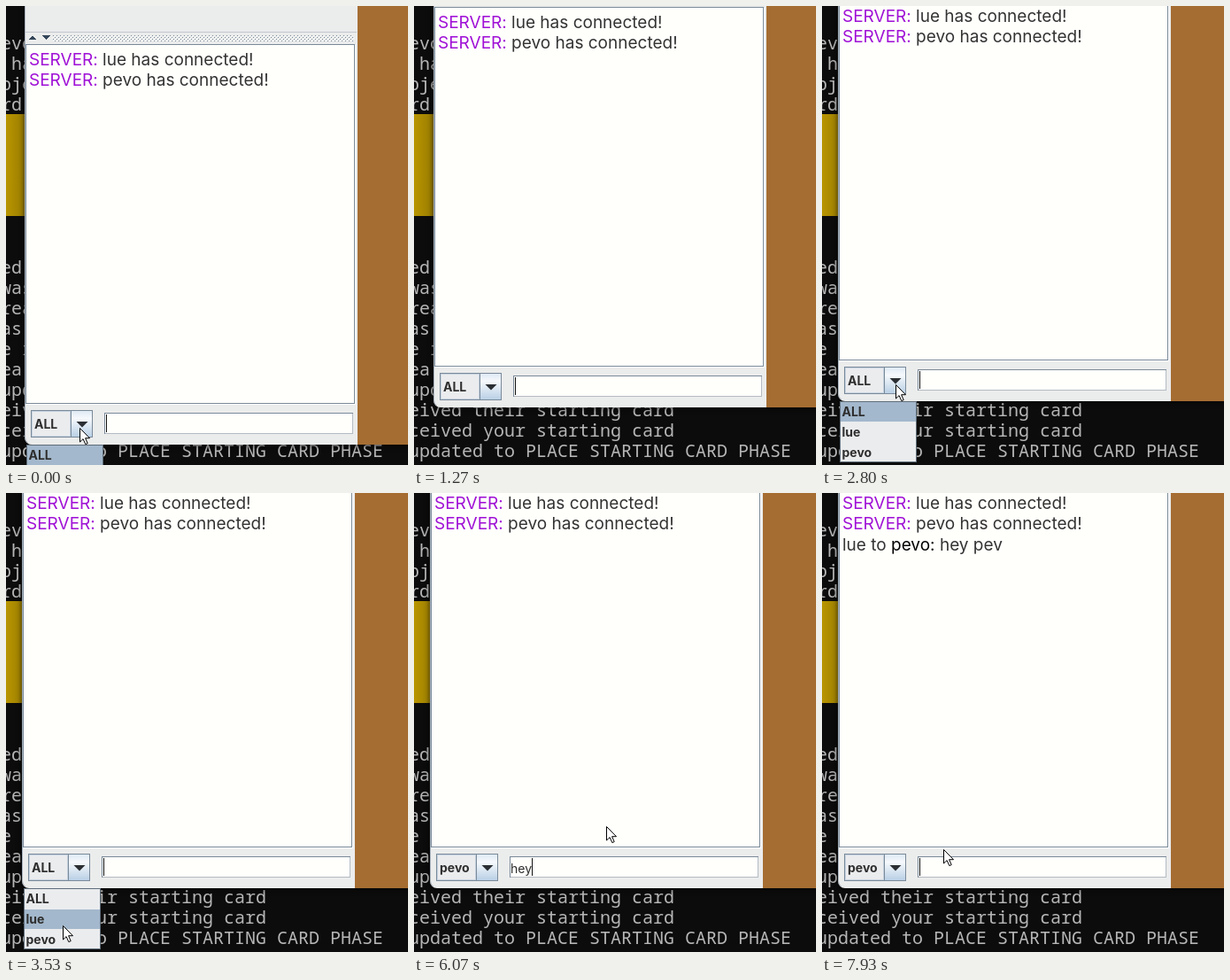
These frames come from a looping animation (454x518 px, 8000 ms). An HTML page:

```html
<!DOCTYPE html>
<html lang="en">
<head>
<meta charset="utf-8">
<title>Chat window</title>
<style>
  html, body { margin: 0; width: 100%; height: 100%; overflow: hidden; background: #0c0c0c; }
  svg { display: block; width: 100%; height: 100%; }
  text { white-space: pre; }
  #terminal { font: 20px "Noto Sans Mono", monospace; fill: #b6b6b6; }
  .chat { font: 19px Inter, sans-serif; fill: #333; }
  .server { fill: #a012d6; }
  .label { font: bold 14px Inter, sans-serif; fill: #2e2e2e; }
  .typed { font: 14px Inter, sans-serif; fill: #2e2e2e; }
  .line { fill: none; stroke: #7a8a99; }
  .crisp { shape-rendering: crispEdges; }
</style>
</head>
<body>
<svg viewBox="0 0 454 518">
  <defs>
    <pattern id="bumps" width="4" height="4" patternUnits="userSpaceOnUse">
      <path d="M0 0h1v1h-1zM2 2h1v1h-1z" fill="#fff"/>
      <path d="M1 1h1v1h-1zM3 3h1v1h-1z" fill="#7a8a99"/>
    </pattern>
    <linearGradient id="button" x2="0" y2="1">
      <stop stop-color="#dde8f3"/>
      <stop offset=".3" stop-color="#f6f9fc"/>
      <stop offset="1" stop-color="#b8cfe5"/>
    </linearGradient>
    <linearGradient id="gold">
      <stop stop-color="#b89500"/>
      <stop offset="1" stop-color="#967900"/>
    </linearGradient>
  </defs>

  <g id="terminal">
    <rect y="122" width="24" height="115" fill="url(#gold)"/>
  </g>

  <g id="window">
    <path d="M21 -80H500V495H29a8 8 0 0 1-8-8z" fill="#ebecec" style="filter:drop-shadow(0 1px 3px #000a)"/>
    <rect x="397" y="-80" width="110" height="575" fill="#a56d32"/>
    <path class="line" d="M21.5 -80V487a8 8 0 0 0 3 6" stroke-opacity=".6"/>
    <g class="crisp">
      <rect x="22" y="29" width="374" height="1" fill="#c3c8cd"/>
      <rect x="52" y="33" width="341" height="7" fill="url(#bumps)"/>
      <path d="M26 38l4-5 4 5zM40 33h10l-5 5z" fill="#34465a"/>
      <rect x="22.5" y="43.5" width="371" height="405" fill="#fffffc" stroke="#7a8a99"/>
      <path d="M394.5 44V449.5H23" fill="none" stroke="#fff"/>
    </g>

    <text class="chat" x="26" y="67"><tspan class="server">SERVER:</tspan> lue has connected!</text>
    <text class="chat" x="26" y="90"><tspan class="server">SERVER:</tspan> pevo has connected!</text>
    <text class="chat" x="26" y="114" id="message">lue to <tspan fill="#000">pevo:</tspan> hey pev</text>

    <g class="crisp">
      <rect class="line" x="28.5" y="456.5" width="69" height="30"/>
      <rect x="29.5" y="457.5" width="43" height="28" fill="#ebecee" stroke="#c5d2df"/>
      <rect x="73.5" y="456.5" width="24" height="30" fill="url(#button)" stroke="#7a8a99"/>
      <rect x="111.5" y="459.5" width="280" height="23" fill="#fffffc" stroke="#b4bbc2"/>
      <path class="line" d="M111.5 483V459.5H392"/>
      <rect id="caret" y="461" width="1" height="20" fill="#111"/>
    </g>
    <path d="M79.5 469h13l-6.500 6.500z" fill="#2b2f33"/>
    <text class="label" id="choice" x="32" y="477"></text>
    <text class="typed" id="typed" x="112" y="478"></text>

    <g id="popup">
      <rect class="crisp" x="23.500" y="495.500" width="86" height="68" fill="#ebecee" stroke="#5f6d7a"/>
      <rect class="crisp" id="highlight" x="24" width="85" height="22" fill="#a3b8cc"/>
    </g>
  </g>

  <path id="arrow" d="M.5 .5V16l3.600-3.400 2.700 6 2.400-1-2.600-5.900H11.500z" fill="#fff" stroke="#000"/>
  <g id="beam" fill="none">
    <path d="M-3 -8h2.500l.5 .5 .5-.5H3M0 -7.500V7.500M-3 8h2.500l.5-.5 .5 .5H3" stroke="#111"/>
  </g>
</svg>
<script>
const LOOP = 8000;
const names = ["ALL", "lue", "pevo"];
const $ = id => document.getElementById(id);

function addText(parent, x, y, text, className = "") {
  const node = document.createElementNS("http://www.w3.org/2000/svg", "text");
  node.setAttribute("x", x);
  node.setAttribute("y", y);
  node.setAttribute("class", className);
  node.textContent = text;
  parent.append(node);
}

const terminalRows = ("evo| ha|bje|rd||||||||ed|was|rea|as|e i|ea|upd|" +
  "eived their starting card|ceived your starting card|" +
  "updated to PLACE STARTING CARD PHASE").split("|");
terminalRows.forEach((row, i) => addText($("terminal"), -6, 49 + 23 * i, row));
names.forEach((name, i) => addText($("popup"), 25.5, 512 + 23 * i, name, "label"));

// Keyframes are [time, x, y].
const windowPath = [[0, 0, 0], [930, 0, 0], [1270, 1, -42], [1470, -3, -49]];
const pointerPath = [
  [0, 83, 476], [330, 83, 476], [870, 456, 34],
  [870, 293, -30], [1600, 293, -30], [1670, 293, 4], [2400, 83, 427],
  [3000, 83, 427], [3650, 62, 494], [3930, 62, 494], [4330, 165, 430],
  [5270, 165, 430], [5600, 217, 376], [7400, 217, 376], [7870, 137, 402]
];
const keyTimes = [5670, 5800, 5930, 6130, 6400, 6730, 7070];
const SENT = 7330, PICKED = 3900;

function along(path, t) {
  const i = path.findLastIndex(key => key[0] <= t);
  const [t0, x0, y0] = path[i];
  const [t1, x1, y1] = path[i + 1] || [t0 + 1, x0, y0];
  const p = (t - t0) / (t1 - t0), e = p * p * (3 - 2 * p);
  return [Math.round(x0 + (x1 - x0) * e), Math.round(y0 + (y1 - y0) * e)];
}

const show = (id, on) => { $(id).style.display = on ? "" : "none"; };
const place = (id, x, y) => $(id).setAttribute("transform", `translate(${x} ${y})`);

function draw(t) {
  const [wx, wy] = along(windowPath, t);
  const [px, py] = along(pointerPath, t);
  place("window", wx, wy);

  const x = px - wx, y = py - wy;
  const inField = x > 111 && x < 392 && y > 459 && y < 483 && t > PICKED;
  show("arrow", !inField);
  show("beam", inField);
  place("arrow", px, py);
  place("beam", px + .5, py);

  show("popup", t < 270 || (t >= 2600 && t < PICKED));
  const row = Math.max(0, Math.min(2, Math.floor((y - 495) / 23)));
  $("highlight").setAttribute("y", 496 + 23 * row);
  $("choice").textContent = names[t < PICKED ? 0 : 2];

  const count = t < SENT ? keyTimes.filter(k => k <= t).length : 0;
  $("typed").textContent = "hey pev".slice(0, count);
  const width = count ? $("typed").getComputedTextLength() : 0;
  $("caret").setAttribute("x", Math.max(113, Math.round(112 + width)));
  show("message", t >= SENT);
}

const start = performance.now();
function tick() {
  draw((performance.now() - start) % LOOP);
  requestAnimationFrame(tick);
}
tick();
</script>
</body>
</html>
```
